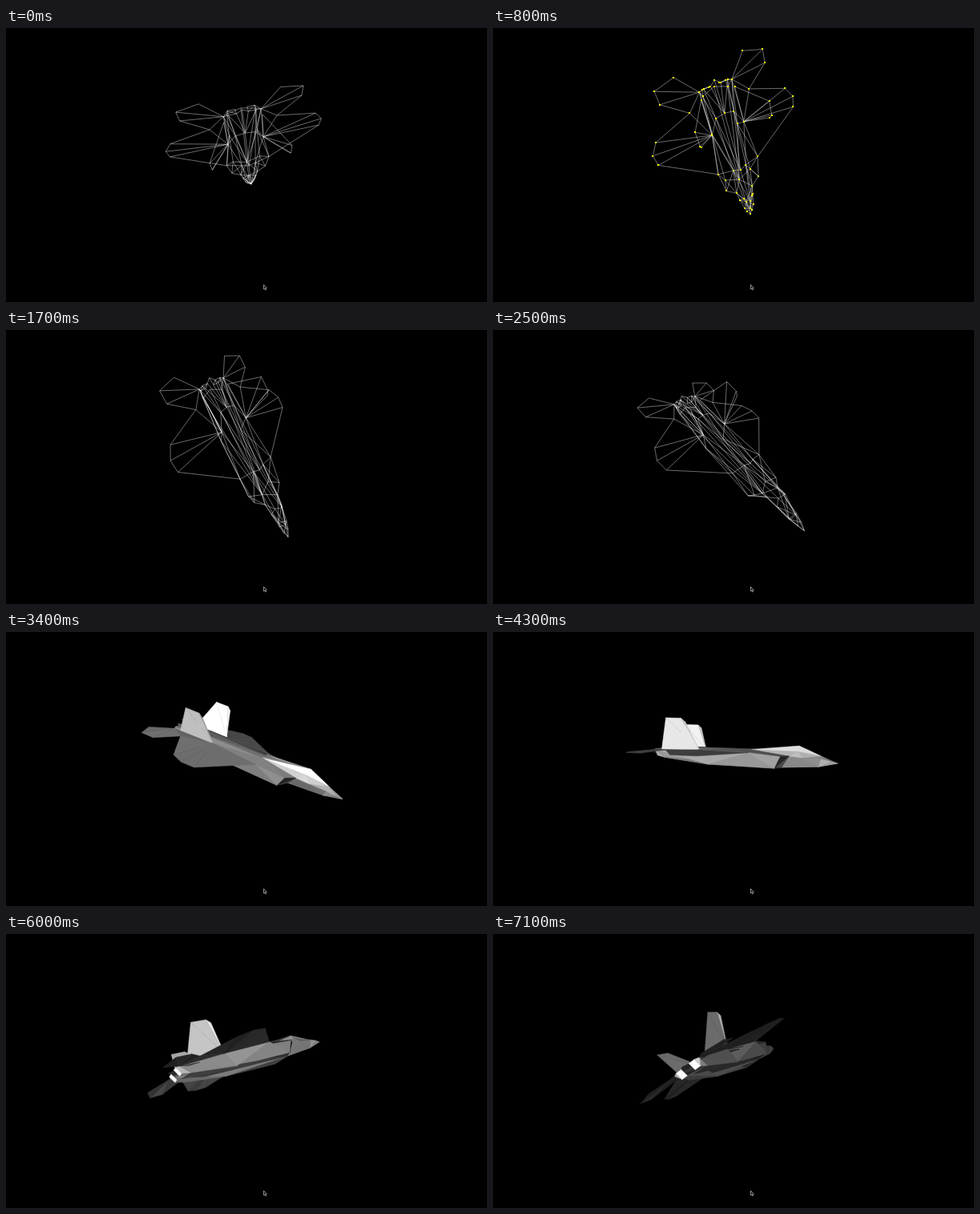
Recreate the animation shown at these times as an HTML page with a canvas. Size 600 by 342 pixels, loop 7200 ms.

```html
<!DOCTYPE html>
<html lang="en">
<head>
<meta charset="utf-8">
<title>Turning jet model</title>
<style>
  html, body { margin: 0; width: 100%; height: 100%; overflow: hidden; background: #000; }
  canvas { display: block; width: 600px; height: 342px; }
</style>
</head>
<body>
<canvas id="stage" width="600" height="342"></canvas>
<script>
const LOOP = 7200, STEP = 100;
const CAMERA = 420, CENTER = [300, 154];
const DOTS = [400, 1200], SOLID_FROM = 3400;
const LIGHT = [-0.2, 0.05, 0.975];

// Model space: x to the right wing, y up, z to the nose. Only one half is listed.
const body = {
  n: [0, -4, 126], t: [0, 4, 106], c: [0, 15, 80], r: [0, 9, 25], u: [0, -9, 104],
  k: [0, -12, 60], s: [0, 8, -62], e: [0, 4, -102], f: [0, -6, -90], p: [4, -2, 117],
  g: [7, 0, 105], h: [10, 1, 84], d: [6, 8, 78], j: [12, 2, 68], i: [24, 1, 57],
  m: [19, -13, 51], a: [28, 4, 21], q: [9, 8, 22], o: [17, -12, -28],
  l: [15, -6, -84], v: [11, 8, -60]
};
const tail = {
  W: [6, 4, -97], w: [14, 4, -97], y: [14, -4, -93], X: [6, -4, -93],
  x: [19, 3, -95], A: [39, -1, -119], B: [62, -2, -112], C: [62, -2, -96],
  P: [20.5, 5, -39], F: [20, 4, -86], G: [42, 40, -75], H: [42, 40, -57], I: [41, 36, -52]
};
const wing = { Q: [36, 3, -76], L: [90, -2, -25], M: [91, -2, -40], N: [82, -2, -55] };
const points = { ...body, ...tail, ...wing };

// Each word is a fan of triangles around its first point.
const FANS = ('npt pgt npu pgu tghd tdc cdqr dhjq ughjk kjm jim qjia qaPv rqvs miao oaP oPxl ' +
  'kmolf PaLMNQ PQx vPxw svwWe xABCQ PFGHI WwyX xwyl').split(' ');
const TINT = {
  jim: 0.3, WwyX: 1.6, tdc: 1.2, cdqr: 1.2, PFGHI: 1.2,
  miao: 0.78, oaP: 0.78, oPxl: 0.78, ughjk: 0.8
};

// Time, nose direction, right wing direction (screen x, up, toward the viewer).
const POSES = [
  [0,    0.05, -0.43, -0.90,  -0.976, -0.214, 0.04],
  [800,  0.21, -0.75, -0.62,  -0.90, -0.37, 0.20],
  [1700, 0.45, -0.865, -0.17, -0.73, -0.40, 0.56],
  [2500, 0.68, -0.71, 0.20,   -0.62, -0.37, 0.69],
  [4300, 0.99, -0.045, 0.13,  -0.08, 0, 0.99],
  [6000, 0.82, 0.205, -0.53,  0.37, 0.38, 0.83],
  [7100, 0.48, 0.13, -0.87,   0.66, 0.49, 0.53]
];

const dot = (a, b) => a[0] * b[0] + a[1] * b[1] + a[2] * b[2];
const cross = (a, b) => [a[1] * b[2] - a[2] * b[1], a[2] * b[0] - a[0] * b[2], a[0] * b[1] - a[1] * b[0]];
const sub = (a, b) => a.map((v, i) => v - b[i]);
const unit = a => { const n = Math.hypot(...a) || 1; return a.map(v => v / n); };

const verts = [], tris = [], edges = [];

function buildModel() {
  const index = {}, seen = new Set();
  for (const [name, [x, y, z]] of Object.entries(points)) {
    index[name] = [verts.push([x, y, z]) - 1];
    index[name].push(x ? verts.push([-x, y, z]) - 1 : index[name][0]);
  }
  for (const fan of FANS) for (const side of [0, 1]) {
    const ids = [...fan].map(ch => index[ch][side]);
    for (let n = 1; n < ids.length - 1; n++) {
      const tri = [ids[0], ids[n], ids[n + 1]];
      tris.push({ tri, tint: TINT[fan] || 1 });
      tri.forEach((p, i) => {
        const q = tri[(i + 1) % 3], key = Math.min(p, q) + '-' + Math.max(p, q);
        if (!seen.has(key)) { seen.add(key); edges.push([p, q]); }
      });
    }
  }
}

function slope(i, c) {
  const a = POSES[Math.max(i - 1, 0)], b = POSES[Math.min(i + 1, POSES.length - 1)];
  return (b[c] - a[c]) / (b[0] - a[0]);
}

// Smooth cubic through the poses, then made orthogonal again.
function axesAt(time) {
  let i = 0;
  while (i < POSES.length - 2 && time > POSES[i + 1][0]) i++;
  const a = POSES[i], b = POSES[i + 1], span = b[0] - a[0];
  const u = (time - a[0]) / span, w = u * u * (3 - 2 * u);
  const at = c => a[c] + (b[c] - a[c]) * w +
    span * u * (1 - u) * ((1 - u) * slope(i, c) - u * slope(i + 1, c));
  const nose = unit([1, 2, 3].map(at)), side = [4, 5, 6].map(at), d = dot(side, nose);
  const right = unit(side.map((v, n) => v - d * nose[n]));
  return [right, cross(right, nose), nose];
}

const ctx = document.getElementById('stage').getContext('2d');

function path(list) {
  ctx.beginPath();
  list.forEach(([x, y], i) => i ? ctx.lineTo(x, y) : ctx.moveTo(x, y));
}

function drawWire(flat) {
  ctx.strokeStyle = 'rgba(255,255,255,0.6)';
  ctx.lineWidth = 0.7;
  for (const [p, q] of edges) { path([flat[p], flat[q]]); ctx.stroke(); }
}

function drawDots(flat) {
  ctx.fillStyle = '#ff0';
  for (const [x, y] of flat) ctx.fillRect(Math.round(x) - 1, Math.round(y) - 1, 2, 2);
}

function drawSolid(world, flat) {
  const eye = [0, 0, CAMERA];
  const faces = tris.map(({ tri, tint }) => {
    const [a, b, c] = tri.map(i => world[i]);
    const mid = a.map((v, i) => (v + b[i] + c[i]) / 3);
    const view = sub(eye, mid);
    let normal = unit(cross(sub(b, a), sub(c, a)));
    if (dot(normal, view) < 0) normal = normal.map(v => -v);
    const level = (32 + 195 * Math.max(0, dot(normal, LIGHT))) * tint;
    return { tri, far: Math.hypot(...view), tone: Math.min(255, Math.round(level)) };
  });
  faces.sort((a, b) => b.far - a.far);
  ctx.lineWidth = 0.5;
  for (const { tri, tone } of faces) {
    ctx.fillStyle = ctx.strokeStyle = `rgb(${tone},${tone},${tone})`;
    path(tri.map(i => flat[i]));
    ctx.closePath();
    ctx.fill();
    ctx.stroke();
  }
}

function drawCursor() {
  path([[321.5, 320.5], [321.5, 326], [322.7, 325], [323.6, 327], [324.5, 326.5], [323.7, 324.7], [325.2, 324.5]]);
  ctx.closePath();
  ctx.fillStyle = '#000';
  ctx.fill();
  ctx.strokeStyle = '#ccc';
  ctx.lineWidth = 0.7;
  ctx.stroke();
}

function draw(time) {
  const axes = axesAt(time);
  const world = verts.map(p => [0, 1, 2].map(c => dot(p, axes.map(a => a[c]))));
  const flat = world.map(([x, y, z]) => {
    const s = CAMERA / (CAMERA - z);
    return [CENTER[0] + x * s, CENTER[1] - y * s];
  });
  ctx.fillStyle = '#000';
  ctx.fillRect(0, 0, 600, 342);
  if (time >= SOLID_FROM) drawSolid(world, flat);
  else drawWire(flat);
  if (time >= DOTS[0] && time < DOTS[1]) drawDots(flat);
  drawCursor();
}

buildModel();
const start = performance.now();
function tick() {
  const t = (performance.now() - start) % LOOP;
  draw(Math.floor(t / STEP) * STEP);
  requestAnimationFrame(tick);
}
tick();
</script>
</body>
</html>
```
